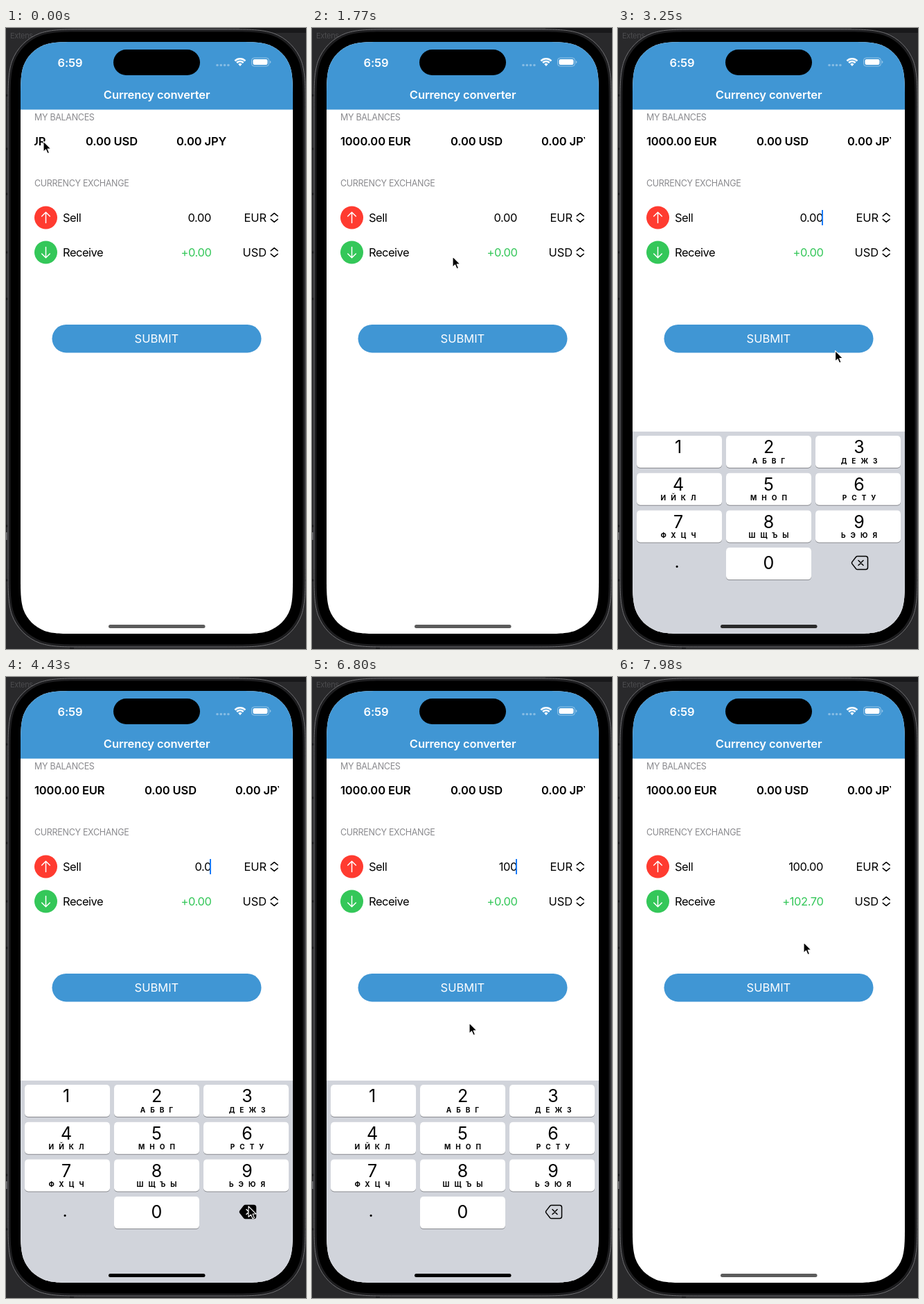
An HTML page for the animation above (8 s loop, 433 px wide and 894 px high).

```html
<!DOCTYPE html>
<html lang="en">
<head>
<meta charset="utf-8">
<title>Currency converter</title>
<style>
  html, body { margin: 0; width: 100%; height: 100%; overflow: hidden; background: #29292b; }
  svg { display: block; width: 433px; height: 894px; }
  text { font-family: Inter, "Open Sans", sans-serif; font-size: 16.5px; letter-spacing: -.4px; }
  .end { text-anchor: end; }
  .mid { text-anchor: middle; }
  .bold { font-weight: 600; letter-spacing: -.12px; }
  .label { letter-spacing: -.5px; }
  .unit { text-anchor: end; letter-spacing: -.1px; }
  .white { fill: #fff; }
  .head { font-size: 12.5px; letter-spacing: -.3px; fill: #8a8a8e; }
  .digit { font-size: 25px; letter-spacing: 0; text-anchor: middle; }
  .letters { font-size: 10px; font-weight: 700; letter-spacing: 7px; text-anchor: middle; }
  .line { fill: none; stroke-width: 1.5; stroke-linecap: round; stroke-linejoin: round; }
</style>
</head>
<body>
<svg viewBox="0 0 433 894">
  <defs>
    <clipPath id="screen"><path id="glass"/></clipPath>
    <clipPath id="strip"><rect x="41" y="145" width="353" height="40"/></clipPath>
    <path id="chevrons" class="line" stroke="#000" d="M382.3 270.7l4.9-4 4.9 4M382.3 275.3l4.9 4 4.9-4"/>
  </defs>

  <!-- desktop behind the phone -->
  <rect width="433" height="894" fill="#29292b"/>
  <path d="M0 97h4M0 174h4M0 239h4M0 323h4M0 390h4M0 717h4M0 795h8M425 795h8" stroke="#151517" stroke-width="3"/>
  <path d="M337 0h96v7h-96zM92 886h6v8h-6z" fill="#19191b"/>
  <rect x="0" y="726" width="1.5" height="11" fill="#77777a"/>
  <text x="6" y="15" style="font-size:11px" fill="#4b4b4e">Extens</text>

  <!-- phone body -->
  <path id="frame" fill="#1d1d1f" stroke="#6f6f72"/>
  <path id="bezel"/>

  <g clip-path="url(#screen)">
    <rect x="21" y="20" width="393" height="852" fill="#fff"/>
    <rect x="21" y="20" width="393" height="97.5" fill="#4096d4"/>
    <rect x="155" y="31" width="125" height="37" rx="18.5"/>

    <text class="bold white mid" x="92.5" y="55.5">6:59</text>
    <g fill="#fff" opacity=".36">
      <circle cx="305" cy="53.5" r="1.8"/><circle cx="310.3" cy="53.5" r="1.8"/>
      <circle cx="315.6" cy="53.5" r="1.8"/><circle cx="320.9" cy="53.5" r="1.8"/>
    </g>
    <g fill="none" stroke="#fff" stroke-width="2.5">
      <path d="M330.4 47.3a10.6 10.6 0 0 1 15 0M333.1 50a6.8 6.8 0 0 1 9.6 0"/>
      <path d="M335.2 52.1a3.8 3.8 0 0 1 5.4 0l-2.7 2.9z" fill="#fff" stroke="none"/>
    </g>
    <rect x="354.5" y="43" width="25" height="12" rx="3.8" fill="none" stroke="#fff" stroke-opacity=".45"/>
    <rect x="356.5" y="45" width="21" height="8" rx="2.3" fill="#fff"/>
    <path d="M381 47v4q1.4-.5 1.4-2t-1.4-2" fill="#fff" opacity=".5"/>
    <text class="bold white mid" x="217.6" y="101.5">Currency converter</text>

    <text class="head" x="41" y="133.3">MY BALANCES</text>
    <g clip-path="url(#strip)">
      <g id="balances">
        <text class="bold" x="41" y="169">1000.00 EUR</text>
        <text class="bold" x="200" y="169">0.00 USD</text>
        <text class="bold" x="331" y="169">0.00 JPY</text>
      </g>
    </g>

    <text class="head" x="41" y="227.5">CURRENCY EXCHANGE</text>
    <circle cx="57.5" cy="273" r="16.5" fill="#ff3b30"/>
    <path class="line" stroke="#fff" d="M57.5 280.5v-15M51.7 271l5.8-5.8 5.8 5.8"/>
    <text class="label" x="82" y="279">Sell</text>
    <text id="sell" class="end" x="296" y="279"></text>
    <text class="unit" x="376" y="279">EUR</text>
    <use href="#chevrons"/>
    <circle cx="57.5" cy="323" r="16.5" fill="#34c759"/>
    <path class="line" stroke="#fff" d="M57.5 315.5v15M51.7 325l5.8 5.8 5.8-5.8"/>
    <text class="label" x="82" y="329">Receive</text>
    <text id="receive" class="end" x="296.5" y="329" fill="#34c759"></text>
    <text class="unit" x="376" y="329">USD</text>
    <use href="#chevrons" y="50"/>
    <rect id="caret" x="294" y="262" width="2" height="22" fill="#1a7bf8"/>

    <rect x="66.5" y="427" width="302" height="40.4" rx="20.2" fill="#4096d4"/>
    <text class="white mid" x="217.4" y="453.4" style="letter-spacing:0">SUBMIT</text>

    <g id="keyboard">
      <rect x="21" y="581" width="393" height="291" fill="#d1d4db"/>
      <g id="keys"></g>
      <text class="digit" x="85" y="777">.</text>
      <g class="line">
        <path id="eraseBody" stroke="#000" d="M345.5 760.5h12q3 0 3 3v13q0 3-3 3h-12q-1 0-1.8-.8l-5.800-7.300q-.8-1.400 0-2.800l5.800-7.300q.8-.8 1.800-.8z"/>
        <path id="eraseCross" d="M347 766.500l7 7M354 766.500l-7 7"/>
      </g>
    </g>
    <rect id="home" x="148" y="859" width="139.5" height="5" rx="2.5"/>
  </g>

  <path id="pointer" d="M0 0V15.3L3.5 12 6 17.7 8.5 16.6 6.1 11H11Z" stroke="#fff" stroke-width="1.1" stroke-linejoin="round"/>
</svg>

<script>
const LOOP = 8000;
const TICK = 7980 / 54;   // the screen refreshes once per tick

// Pointer moves: start ms, end ms, x, y
const MOVES = [
  [0, 740, 162, 169.5], [1180, 1470, 203, 329], [1770, 2210, 290, 272], [2810, 3840, 350, 762],
  [5020, 5760, 92, 606], [5800, 6200, 198, 772], [6510, 6790, 227, 498], [6800, 7390, 268, 382]
];
const OPEN = 2595, ERASE = 4430, CLOSE = 7530;
const PRESSES = [[5760, '1'], [6350, '0'], [6500, '0']];

const $ = id => document.getElementById(id);
const set = (id, name, value) => $(id).setAttribute(name, value);
const clamp = (v, lo, hi) => Math.min(hi, Math.max(lo, v));

// Eased progress from 0 at a to 1 at b
function ease(t, a, b) {
  const p = clamp((t - a) / (b - a), 0, 1);
  return p * p * (3 - 2 * p);
}

// Rounded box whose corners bend gradually
function squircle(x, y, w, h, r) {
  const far = 1.528 * r, mid = .631 * r, near = .075 * r;
  const corner = (cx, cy, sx, sy, flip) => {
    const at = (u, v) => `${cx + sx * u} ${cy + sy * v} `;
    const p = flip ? (u, v) => at(v, u) : at;
    return `L${p(0, far)}C${p(0, 1.089 * r)}${p(0, .868 * r)}${p(near, mid)}` +
      `C${p(.169 * r, .373 * r)}${p(.373 * r, .169 * r)}${p(mid, near)}` +
      `C${p(.868 * r, 0)}${p(1.089 * r, 0)}${p(far, 0)}`;
  };
  const path = corner(x, y, 1, 1) + corner(x + w, y, -1, 1, true) +
    corner(x + w, y + h, -1, -1) + corner(x, y + h, 1, -1, true);
  return 'M' + path.slice(1) + 'Z';
}

function add(tag, attrs, text = '') {
  const el = document.createElementNS('http://www.w3.org/2000/svg', tag);
  for (const name in attrs) el.setAttribute(name, attrs[name]);
  el.textContent = text;
  return $('keys').appendChild(el);
}

const caps = {};

function addKey(digit, col, row, label) {
  const box = { x: 27 + col * 129, y: 587 + row * 53.7, width: 123, height: 46, rx: 5 };
  const cx = 87 + col * 130.5;
  add('rect', { ...box, y: box.y + 1, fill: '#898b90' });
  caps[digit] = add('rect', box);
  add('text', { class: 'digit', x: cx, y: box.y + (digit ? 25.2 : 31.3) }, digit);
  add('text', { class: 'letters', x: cx + 3.5, y: box.y + 39.5 }, label);
}

set('frame', 'd', squircle(3, 2, 429, 889, 73));
set('bezel', 'd', squircle(6.5, 5.5, 422, 882, 70));
set('glass', 'd', squircle(21, 20, 393, 852, 55));
['', 'АБВГ', 'ДЕЖЗ', 'ИЙКЛ', 'МНОП', 'РСТУ', 'ФХЦЧ', 'ШЩЪЫ', 'ЬЭЮЯ']
  .forEach((label, i) => addKey(i + 1, i % 3, Math.floor(i / 3), label));
addKey(0, 1, 3, '');

function pointerAt(t) {
  let x = 54, y = 163;
  for (const [from, to, nx, ny] of MOVES) {
    const p = ease(t, from, to);
    x += (nx - x) * p;
    y += (ny - y) * p;
  }
  return `${x} ${y}`;
}

function sellText(t) {
  if (t >= CLOSE) return '100.00';
  const typed = PRESSES.filter(([at]) => t >= at).map(([, key]) => key).join('');
  const erased = clamp(Math.floor((t - ERASE) / TICK) + 1, 0, 4);
  return typed || '0.00'.slice(0, 4 - erased);
}

function draw(time) {
  const t = Math.floor((time + 5) / TICK) * TICK;
  const erasing = t >= ERASE && t < ERASE + 5 * TICK;
  const pressed = PRESSES.find(([at]) => t >= at && t < at + 140);
  const hidden = 1 - ease(t, OPEN, OPEN + 420) + ease(t, CLOSE - 80, CLOSE + 370);
  const grey = 92 * (1 - ease(t, OPEN, 3840) + ease(t, CLOSE - 80, 7970));

  set('balances', 'transform', `translate(${-85 * (1 - ease(t, 0, 870))} 0)`);
  set('pointer', 'transform', `translate(${pointerAt(t)})`);
  set('keyboard', 'transform', `translate(0 ${291 * hidden})`);
  set('home', 'fill', `rgb(${grey},${grey},${grey})`);
  $('sell').textContent = sellText(t);
  $('receive').textContent = t < CLOSE ? '+0.00' : '+102.70';
  set('caret', 'visibility', t > OPEN && t < CLOSE ? 'visible' : 'hidden');
  set('eraseBody', 'fill', erasing ? '#000' : 'none');
  set('eraseCross', 'stroke', erasing ? '#fff' : '#000');
  for (const key in caps) {
    caps[key].setAttribute('fill', pressed && key === pressed[1] ? '#b4b9c3' : '#fff');
  }
}

const start = performance.now();
function loop() {
  draw((performance.now() - start) % LOOP);
  requestAnimationFrame(loop);
}
loop();
</script>
</body>
</html>
```
